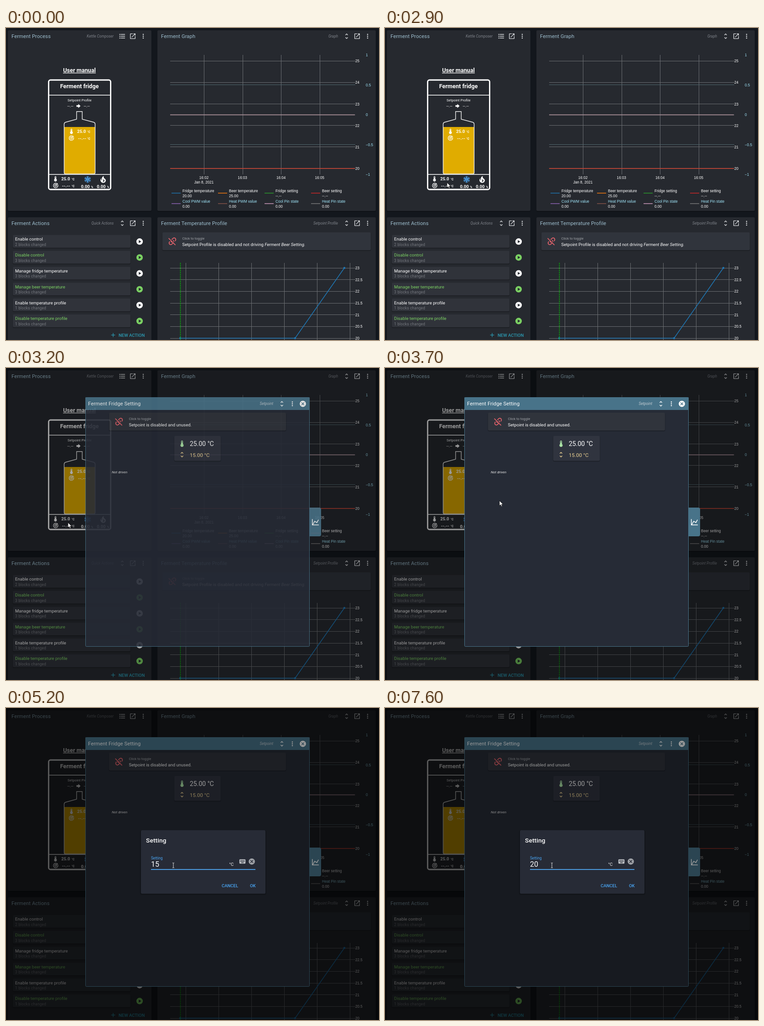
Write an HTML page that moves like this. It is 818 px wide and 684 px high and loops after 8000 ms.

```html
<!DOCTYPE html>
<html lang="en">
<head>
<meta charset="utf-8">
<title>Ferment dashboard</title>
<style>
  html, body { margin: 0; width: 100%; height: 100%; overflow: hidden; background: #13171d; }
  svg { display: block; width: 100%; height: 100%; font-family: Roboto, sans-serif; }
  text { white-space: pre; }
  .plot { font-family: "Liberation Sans", Arial, sans-serif; }
</style>
</head>
<body>
<svg id="stage" viewBox="0 0 818 684"></svg>
<script>
const WHITE = '#fff', CARD = '#26292f', GREEN = '#7bd163', CYAN = '#a1e6fa', RED = '#e2626b',
  TEAL = '#487389', BLUE = '#49a5f3', SAND = '#ecd293', GRID = '#6b6e72', MUTED = '#7f838a';

// Icons on a 24 unit grid
const ICONS = {
  open: 'M14 3v2h3.59l-9.83 9.83 1.41 1.41L19 6.41V10h2V3zM19 19H5V5h7V3H5a2 2 0 0 0-2 2v14a2 2 0 0 0 2 2h14a2 2 0 0 0 2-2v-7h-2z',
  dots: 'M12 4a2 2 0 1 0 0 4 2 2 0 0 0 0-4m0 6a2 2 0 1 0 0 4 2 2 0 0 0 0-4m0 6a2 2 0 1 0 0 4 2 2 0 0 0 0-4z',
  unfold: 'M12 18.17 8.83 15l-1.42 1.41L12 21l4.59-4.59L15.17 15zM12 5.83 15.17 9l1.42-1.41L12 3 7.41 7.59 8.83 9z',
  list: 'M7 5h14v2H7zm0 6h14v2H7zm0 6h14v2H7zM2.5 4.5h3v3h-3zm0 6h3v3h-3zm0 6h3v3h-3z',
  unlink: 'M2 5.27 3.28 4 20 20.72 18.73 22l-4.83-4.83-2.61 2.61a5 5 0 0 1-7.07-7.07l1.49-1.49c0 .82.12 1.64.4 2.43l-.47.47a3 3 0 0 0 4.24 4.24l2.62-2.6-1.62-1.61a1 1 0 0 1-1.71.68A5 5 0 0 1 7.72 11zM12.71 4.22a5 5 0 0 1 7.07 7.07l-1.49 1.49c0-.82-.12-1.64-.4-2.42l.47-.48a3 3 0 0 0-4.24-4.24l-3.33 3.33-1.41-1.42zM13.41 9.17a1 1 0 0 1 1.42 0 5 5 0 0 1 1.23 5.06l-1.78-1.77a3 3 0 0 0-.87-1.87 1 1 0 0 1 0-1.42z',
  thermo: 'M15 13V5a3 3 0 0 0-6 0v8a5 5 0 1 0 6 0m-3-9a1 1 0 0 1 1 1v3h-2V5a1 1 0 0 1 1-1z',
  fire: 'M17.66 11.2c-.23-.3-.51-.56-.77-.82-.67-.6-1.43-1.03-2.07-1.66C13.33 7.26 13 4.85 13.95 3c-.95.23-1.78.75-2.49 1.32-2.59 2.08-3.61 5.75-2.39 8.9.1.4 0 .7-.27.83-.3.1-.6 0-.8-.29-1.13-1.43-1.31-3.48-.55-5.12C5.78 10 4.87 12.3 5 14.47c.06.5.12 1 .29 1.5 1.2 3 3.6 4.7 5.67 4.95 2.14.27 4.43-.12 6.07-1.6 1.83-1.66 2.47-4.32 1.53-6.6zM14.5 17.5c-1.3 1-2.9.6-4-.22 1.19-.28 1.9-1.16 2.11-2.05.3-1.5-.7-2.6-.11-4.29.8 1.8 2.5 2.1 2.87 3.86.2 1-.2 2.1-.87 2.7z',
  arrow: 'M3 15.5v-7h8V3l10 9-10 9v-5.5z',
  keyboard: 'M20 5H4a2 2 0 0 0-2 2v10a2 2 0 0 0 2 2h16a2 2 0 0 0 2-2V7a2 2 0 0 0-2-2M5 8h2v2H5zm3 0h2v2H8zm3 0h2v2h-2zm3 0h2v2h-2zm3 0h2v2h-2zM5 11h2v2H5zm3 0h2v2H8zm3 0h2v2h-2zm3 0h2v2h-2zm3 0h2v2h-2zM8 15h8v2H8z',
  cancel: 'M12 2a10 10 0 1 0 0 20 10 10 0 0 0 0-20m5 13.59L15.59 17 12 13.41 8.41 17 7 15.59 10.59 12 7 8.41 8.41 7 12 10.59 15.59 7 17 8.41 13.41 12z',
  play: 'M12 2a10 10 0 1 0 0 20 10 10 0 0 0 0-20M9.5 7.5 17 12l-7.5 4.5z',
  chart: 'M16 11.78l4.24-7.33 1.73 1-5.23 9.05-6.51-3.75L5.46 19H22v2H2V3h2v14.54L9.5 8z',
  plus: 'M19 13h-6v6h-2v-6H5v-2h6V5h2v6h6z'
};

const icon = (name, cx, cy, size = 16, fill = '#d8dadd') =>
  `<path d="${ICONS[name]}" fill="${fill}" fill-rule="evenodd" transform="translate(${cx - size / 2} ${cy - size / 2}) scale(${size / 24})"/>`;
const text = (x, y, s, size = 9.55, fill = WHITE, attrs = '') =>
  `<text x="${x}" y="${y}" font-size="${size}" fill="${fill}" ${attrs}>${s}</text>`;
const rect = (x, y, w, h, fill, attrs = '') =>
  `<rect x="${x}" y="${y}" width="${w}" height="${h}" fill="${fill}" ${attrs}/>`;
const path = (d, stroke, width = 1, attrs = '') =>
  `<path d="${d}" fill="none" stroke="${stroke}" stroke-width="${width}" ${attrs}/>`;
const raised = (x, y, w, h, fill) =>
  rect(x - .5, y + .5, w + 1, h + 1.2, '#0004', 'rx="3"') + rect(x, y, w, h, fill, 'rx="2.5"');
const BOLD = 'font-weight="700"', MEDIUM = 'font-weight="500"', ITALIC = 'font-style="italic"',
  MID = 'text-anchor="middle"', END = 'text-anchor="end"', TITLE = 'letter-spacing=".1"';

function card(x, y, w, title, kind, first = 'unfold') {
  const r = x + w;
  return raised(x, y, w, y > 400 ? 300 : 396, CARD)
    + text(x + 8, y + 17, title, 11.2, '#9fc0d0', TITLE)
    + text(r - 83, y + 16, kind, 8.18, MUTED, `${ITALIC} ${END}`)
    + icon(first, r - 64, y + 13) + icon('open', r - 41, y + 13) + icon('dots', r - 18, y + 13);
}

const bullseye = (cx, cy) => `<g transform="translate(${cx} ${cy})">`
  + path('M2-4.3A5 5 0 1 0 4.6-1.6M.8-2.2A2.3 2.3 0 1 0 2.3-.6M0 0 4-4M3-5v2h2', WHITE, 1.25) + '</g>';

const snowflake = (cx, cy) => [0, 60, 120, 180, 240, 300].map(a =>
  path('M0 0V-7.6M-2.4-6.6 0-4.4 2.4-6.6M-2-3.8 0-2 2-3.8', '#4c9fe6', 1.1,
    `transform="translate(${cx} ${cy}) rotate(${a})"`)).join('');

const reading = (x, y, value, unit, unitX) =>
  text(x, y, value, 9.55, WHITE, BOLD) + text(unitX, y, unit, 6.6, WHITE, BOLD);

function processCard() {
  return card(4, 5, 315, 'Ferment Process', 'Kettle Composer', 'list')
    + text(161, 97, 'User manual', 12.7, WHITE, `${BOLD} ${MID} text-decoration="underline"`)
    + rect(93.5, 114, 136, 240, 'none', 'rx="4" stroke="#fff" stroke-width="2.8"')
    + path('M94 147.3H229M94 321H229', WHITE, 1.6)
    + text(161, 132, 'Ferment fridge', 12.7, WHITE, `${BOLD} ${MID}`)
    + text(161.3, 160.5, 'Setpoint Profile', 7.74, WHITE, MID)
    + text(134.5, 174, '--.--') + icon('arrow', 159, 171, 12, WHITE) + text(170.5, 174, '--.--')
    + `<path d="M128 217H195V317Q195 320 192 320H131Q128 320 128 317Z" fill="#e0ac00"/>`
    + path('M154.8 183.3H167.2V200L192 206.5Q195.5 207.5 195.5 211V317Q195.5 320 192.5 320H130.5Q127.5 320 127.5 317V211Q127.5 207.5 131 206.5L154.8 200Z', '#f0f0f0', 1.4)
    + icon('thermo', 143.5, 226.5, 14, WHITE) + reading(156, 230, '25.0', '°C', 178)
    + bullseye(143.5, 241) + reading(158, 244.5, '--.--', '°C', 178)
    + icon('thermo', 108.5, 330.5, 14, WHITE) + reading(121.3, 334.3, '25.0', '°C', 143.5)
    + bullseye(109, 345) + reading(122.8, 348.5, '--.--', '°C', 143.5)
    + snowflake(179, 332) + reading(164.5, 351, '0.00', '%', 186.3)
    + icon('fire', 213, 332, 20, WHITE) + reading(199.3, 351, '0.00', '%', 221.3);
}

function graphCard() {
  let s = card(332, 5, 479, 'Ferment Graph', 'Graph') + '<g class="plot">';
  const times = ['16:02', '16:03', '16:04', '16:05'];
  times.forEach((label, i) => {
    const x = 434 + 84.6 * i;
    s += path(`M${Math.round(x) + .5} 59V321`, GRID) + text(x, 331, label, 8.18, WHITE, MID);
  });
  s += text(434, 341, 'Jan 8, 2021', 8.18, WHITE, MID);
  for (let i = 0; i < 6; i++) {
    const y = 72.2 + 47.15 * i;
    s += path(`M360 ${Math.floor(y) + .5}H766`, GRID) + text(766, y + 3, 25 - i, 8.18);
  }
  ['1', '0.5', '0', '−0.5', '−1'].forEach((label, i) => {
    const y = 59 + 65.5 * i;
    if (i % 4) s += path(`M360 ${Math.floor(y) + .5}H766`, '#4f666d');
    s += text(789, y + 3, label, 8.18, CYAN);
  });
  s += path('M360 190.3H765', '#a98f98', 1.7) + path('M360 308H765', '#cf3f2b', 1.7);
  const legend = [
    ['Fridge temperature', '20.00', '#1f77b4'], ['Beer temperature', '25.00', '#ff7f0e'],
    ['Fridge setting', '--.--', '#2ca02c'], ['Beer setting', '--.--', '#d62728'],
    ['Cool PWM value', '0.00', '#9467bd'], ['Heat PWM value', '0.00', '#8c564b'],
    ['Cool Pin state', '0.00', '#d9a3c6'], ['Heat Pin state', '0.00', '#7f7f7f']];
  legend.forEach(([name, value, color], i) => {
    const x = 363 + 102 * (i % 4), y = i < 4 ? 360 : 383;
    s += path(`M${x} ${y + 2}h20`, color, 1.4)
      + text(x + 24, y, name, 8.18, i < 4 ? WHITE : CYAN) + text(x + 24, y + 11, value, 8.18);
  });
  return s + '</g>';
}

function actionsCard() {
  const actions = [['Enable control', 2], ['Disable control', 3], ['Manage fridge temperature', 3],
    ['Manage beer temperature', 3], ['Enable temperature profile', 1], ['Disable temperature profile', 1]];
  return card(4, 415, 315, 'Ferment Actions', 'Quick Actions')
    + actions.map(([name, count], i) => {
      const y = 453.7 + 34.85 * i, color = i % 2 ? GREEN : WHITE;
      return raised(15, y, 258, 28, '#30333a') + text(20, y + 12.5, name, 9.55, color)
        + text(20, y + 24, `${count} blocks changed`, 8.18, '#777a80', 'letter-spacing=".27"')
        + icon('play', 293, y + 14.5, 17, color);
    }).join('')
    + icon('plus', 235, 673, 15, '#2c9db5') + text(247, 676.5, 'NEW ACTION', 9.55, '#2c9db5', MEDIUM);
}

const toggle = (x, y, w, label) => raised(x, y, w, 39, '#30343c')
  + icon('unlink', x + 22, y + 19.5, 21.5, RED)
  + text(x + 43.5, y + 15.5, 'Click to toggle', 7.7, '#a0a3a8') + text(x + 43.5, y + 29.7, label);

function profileCard() {
  let s = card(332, 415, 479, 'Ferment Temperature Profile', 'Setpoint Profile')
    + toggle(343, 448, 457, `Setpoint Profile is disabled and not driving <tspan ${ITALIC}>Ferment Beer Setting.</tspan>`)
    + '<g class="plot">';
  for (let i = 0; i < 6; i++) s += path(`M${Math.floor(394.5 + 72 * i) + .5} 515V684`, GRID);
  for (let i = 0; i < 7; i++) {
    const y = 526 + 25.67 * i;
    s += path(`M360 ${Math.floor(y) + .5}H766`, GRID) + text(766, y + 3, 23 - i / 2, 8.18);
  }
  s += path('M382 680H634L742 526', '#1f77b4', 1.5);
  for (const [x, y] of [[382, 680], [634, 680], [742, 526]]) s += `<circle cx="${x}" cy="${y}" r="2.2" fill="#1f77b4"/>`;
  return s + path('M382.5 515V684', '#00d000', 1.6, 'stroke-dasharray="2 2"') + '</g>';
}

function settingDialog() {
  return path('M666 306h21q4 0 4 4v55q0 4-4 4h-21z', TEAL, 0, `style="fill:${TEAL}"`)
    + icon('chart', 678.5, 338, 18, WHITE)
    + rect(174.5, 64.5, 491, 546, '#262b36', `rx="2" stroke="${TEAL}"`) + rect(174, 64.5, 492, 27.5, TEAL)
    + text(180, 82, 'Ferment Fridge Setting', 11.2, WHITE, TITLE)
    + text(586, 81, 'Setpoint', 8.18, '#c3cdd3', `${ITALIC} ${END}`)
    + icon('unfold', 605, 78.5, 16, WHITE) + icon('dots', 628, 78.5, 16, WHITE) + icon('cancel', 651, 78.5, 16.5, WHITE)
    + toggle(226, 98, 388, 'Setpoint is disabled and unused.')
    + raised(369, 149, 102, 54.5, '#30343f')
    + icon('thermo', 386, 166, 17, '#a9e0a4') + text(403, 171, '25.00 °C', 14)
    + icon('unfold', 386, 190, 16, SAND) + text(403, 194.5, '15.00 °C', 11.5, SAND)
    + text(232, 230.5, 'Not driven', 7.7, '#e8e8e8', ITALIC);
}

function inputDialog() {
  return rect(294, 268, 277, 142, '#0003', 'rx="4"') + rect(296, 268, 273, 139, '#272b36', 'rx="2.5"')
    + text(307, 294.5, 'Setting', 13.64, WHITE, `${MEDIUM} letter-spacing=".17"`)
    + text(318, 331.5, 'Setting', 8.18, BLUE)
    + text(318, 347.5, '', 16, WHITE, 'id="value"') + rect(336, 332, 1, 19, WHITE, 'id="caret"')
    + '<g id="suffix">' + text(489.5, 345.5, '°C', 9.5) + icon('keyboard', 518.5, 336.5, 16, '#bfc2c7') + '</g>'
    + `<g id="clear">${icon('cancel', 539, 336.5, 16.5, '#a0a3a8')}</g>`
    + path('M318 354H547', '#8e9197', 1) + rect(-114.5, 353.2, 229, 1.7, BLUE, 'id="underline"')
    + text(473, 393, 'CANCEL', 9.55, BLUE, MEDIUM) + text(535, 393, 'OK', 9.55, BLUE, MEDIUM);
}

const shade = id => rect(0, 0, 818, 684, '#000', `id="${id}"`);
const outlined = (id, d) => `<path id="${id}" d="${d}" fill="#fff" stroke="#111" stroke-width=".8"/>`;

document.getElementById('stage').innerHTML = rect(0, 0, 818, 684, '#13171d')
  + processCard() + graphCard() + actionsCard() + profileCard()
  + shade('shade1') + `<g id="dialog1">${settingDialog()}</g>`
  + shade('shade2') + `<g id="dialog2">${inputDialog()}</g>`
  + '<g id="cursor">'
  + outlined('arrow', 'M0 0v11l2.6-2.4 1.7 3.9 1.9-.8-1.7-3.8h3.6z')
  + outlined('hand', 'M-1 .3c0-1 2-1 2 0V4.5l5 1q1.5.4 1.2 2L6.3 11.5H.5L-3.5 7q0-1.6 2.5-.3z')
  + path('M-2-5.5Q0-5.5 0-4.5 0-5.5 2-5.5M0-4.5V4.5M-2 5.5Q0 5.5 0 4.5 0 5.5 2 5.5', '#e4e4e4', 1, 'id="beam"')
  + '</g>';

const el = {};
document.querySelectorAll('#stage [id]').forEach(node => el[node.id] = node);

const LOOP = 8000, OPEN1 = 3050, OPEN2 = 4550, FADE = 300;
const clamp = v => Math.min(1, Math.max(0, v));
const easeOut = (u, power) => 1 - (1 - clamp(u)) ** power;
const linear = u => u, slowing = u => easeOut(u, 2), smooth = u => u * u * (3 - 2 * u);

// time, x, y, easing into the point
const TRACK = [
  [800, 8, 11], [1600, 92, 263, linear], [2000, 136, 339, slowing], [3300, 136, 339, linear],
  [3700, 251, 291, linear], [3900, 327, 251, linear], [4300, 416, 175, slowing], [4800, 416, 175, linear],
  [5200, 367, 345, smooth], [5400, 366, 345, linear]];
// each entry also restarts the caret blink
const EDITS = [[OPEN2, '15'], [5300, '15'], [6100, '1'], [6300, ''], [6400, ''], [6900, '2'], [7100, '20']];

function cursorAt(t) {
  const i = TRACK.findIndex(p => p[0] > t);
  if (i < 0) return TRACK[TRACK.length - 1].slice(1, 3);
  const [t0, x0, y0] = TRACK[Math.max(0, i - 1)], [t1, x1, y1, ease = linear] = TRACK[i];
  const k = t1 > t0 ? ease((t - t0) / (t1 - t0)) : 0;
  return [x0 + (x1 - x0) * k, y0 + (y1 - y0) * k];
}

const show = (node, on) => node.setAttribute('display', on ? 'inline' : 'none');
const move = (node, value) => node.setAttribute('transform', value);

function drawCursor(t) {
  const [x, y] = cursorAt(t);
  const onReading = t < 2900 && y > 322;
  const onCard = t > 3900 && t < 4600 && x > 369 && y < 204;
  const shape = onReading || onCard ? 'hand' : t > 4800 && y > 325 ? 'beam' : 'arrow';
  for (const name of ['arrow', 'hand', 'beam']) show(el[name], name === shape);
  show(el.cursor, t >= 800);
  move(el.cursor, `translate(${Math.round(x)} ${Math.round(y)})`);
}

function drawInput(t) {
  const [since, value] = EDITS.filter(e => e[0] <= t).pop() || EDITS[0];
  el.value.textContent = value;
  el.caret.setAttribute('x', value ? 318 + 9 * value.length : 319);
  show(el.caret, Math.floor((t - since) / 500) % 2 === 0);
  show(el.clear, value);
  move(el.suffix, `translate(${value ? 0 : 20.5})`);
  move(el.underline, `translate(432.5) scale(${easeOut((t - OPEN2) / 360, 2.4)} 1)`);
}

function draw(t) {
  const p1 = easeOut((t - OPEN1) / FADE, 3), p2 = easeOut((t - OPEN2) / FADE, 3);
  el.shade1.setAttribute('opacity', .4 * p1);
  el.dialog1.setAttribute('opacity', p1);
  el.shade2.setAttribute('opacity', .4 * p2);
  el.dialog2.setAttribute('opacity', p2);
  show(el.dialog2, p2 > 0);
  move(el.dialog2, `translate(432.5 337.5) scale(${p2}) translate(-432.5 -337.5)`);
  drawInput(t);
  drawCursor(t);
}

// The picture advances ten times a second
const start = performance.now();
function tick() {
  const t = (performance.now() - start) % LOOP;
  draw(Math.floor(t / 100) * 100);
  requestAnimationFrame(tick);
}
tick();
</script>
</body>
</html>
```
